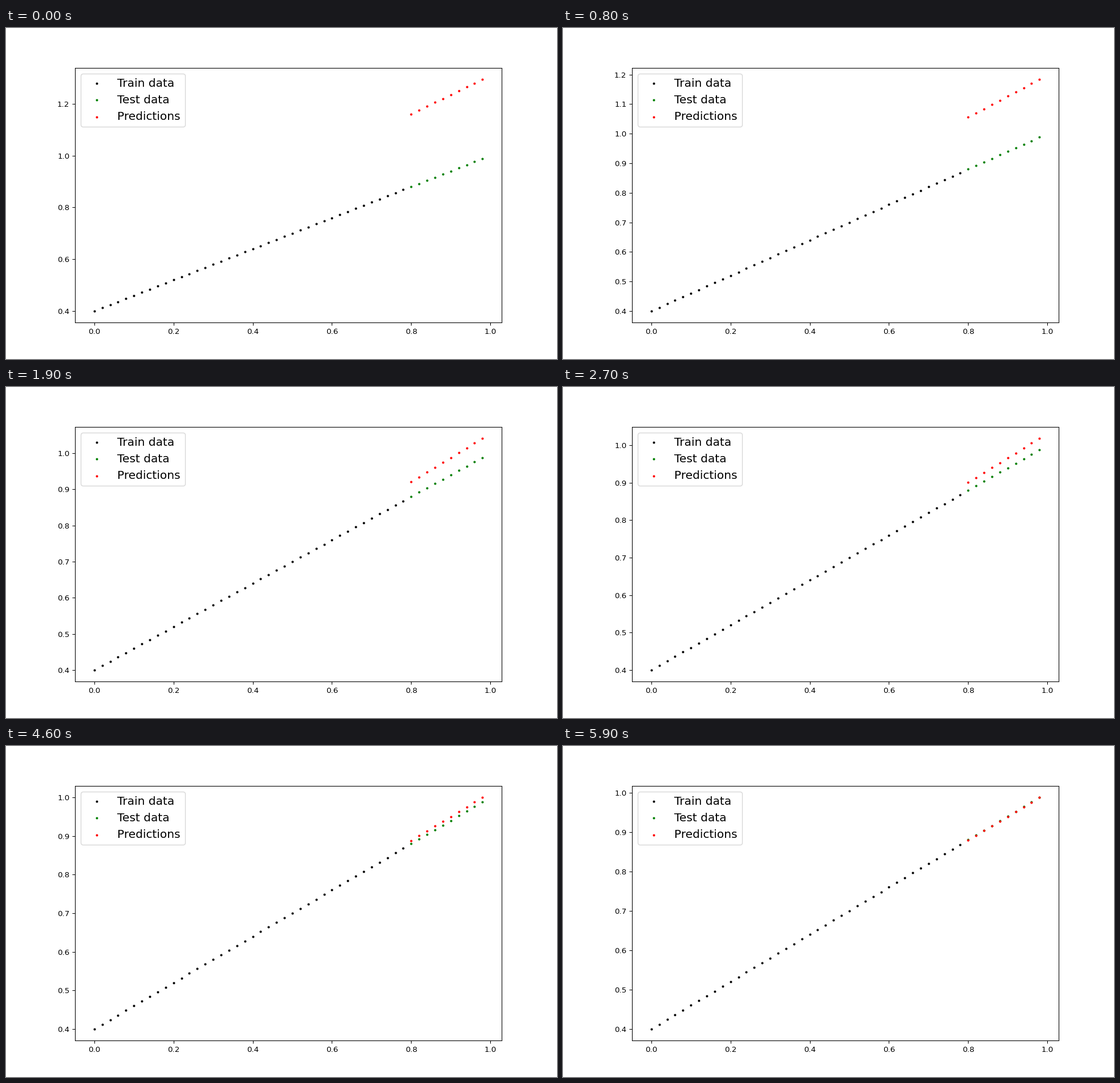
These frames come from a looping animation (966 px wide and 580 px high, 6 s). A matplotlib script:

```python
import matplotlib.pyplot as plt
import numpy as np
from matplotlib.animation import FuncAnimation

DPI = 96.6
FRAMES = 60
INTERVAL = 100

# Straight line to be learned, split into training and test points
SLOPE, BIAS = 0.6, 0.4
x = np.arange(50) * 0.02
y = SLOPE * x + BIAS
x_train, y_train = x[:40], y[:40]
x_test, y_test = x[40:], y[40:]

# Gradient descent on the mean absolute error
RATE = 0.001
WARM_UP = 351
EPOCHS_PER_FRAME = 10


def fit():
    """Return the (slope, bias) estimate shown in each frame."""
    w, b = 0.8823, 0.9150
    history = []
    for epoch in range(WARM_UP + EPOCHS_PER_FRAME * (FRAMES - 1) + 1):
        history.append((w, b))
        sign = np.sign(w * x_train + b - y_train)
        w -= RATE * np.mean(sign * x_train)
        b -= RATE * np.mean(sign)
    return history[WARM_UP::EPOCHS_PER_FRAME]


params = fit()

fig, ax = plt.subplots(figsize=((966 + 1e-6) / DPI, (580 + 1e-6) / DPI), dpi=DPI)


def dots(xs, ys, color, label):
    return ax.scatter(xs, ys, c=color, s=4, label=label)


dots(x_train, y_train, "k", "Train data")
dots(x_test, y_test, "g", "Test data")
predictions = dots(x_test, y_test, "r", "Predictions")
ax.legend(loc="upper left", prop={"size": 15})
ax.set_xlim(x[0] - 0.05 * x[-1], 1.05 * x[-1])


def update(frame):
    w, b = params[frame]
    y_pred = w * x_test + b
    predictions.set_offsets(np.column_stack([x_test, y_pred]))
    low = y.min()
    high = max(y.max(), y_pred.max())
    pad = 0.05 * (high - low)
    ax.set_ylim(low - pad, high + pad)
    return [predictions]


anim = FuncAnimation(fig, update, frames=FRAMES, interval=INTERVAL,
                     repeat=True, repeat_delay=0, blit=False)
plt.show()
```
